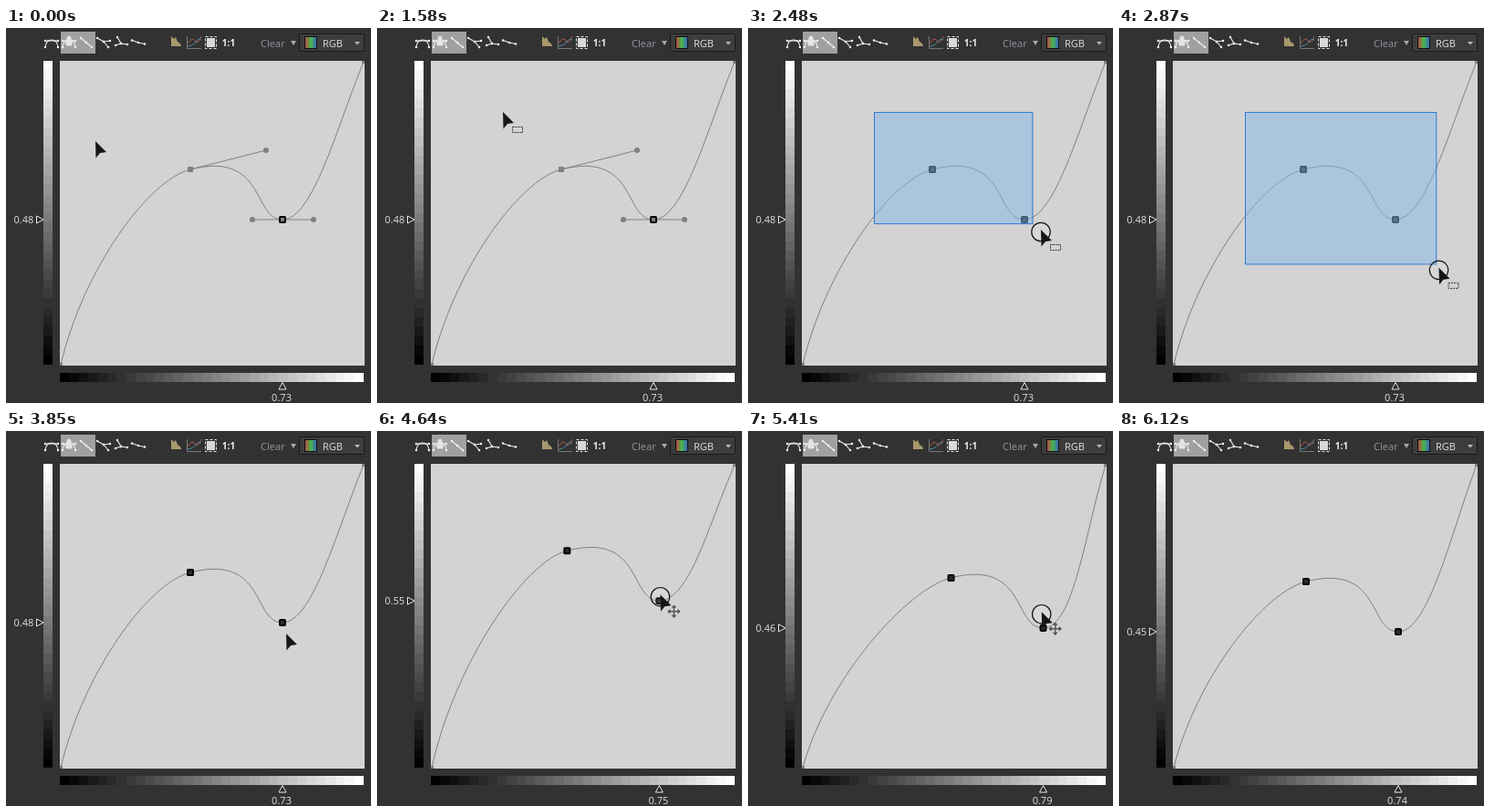
An HTML page that plays this animation: 400 px wide and 411 px high, repeating every 7.84 s.

```html
<!DOCTYPE html>
<html lang="en">
<head>
<meta charset="utf-8">
<title>Curve editor</title>
<style>
  html, body { margin: 0; width: 100%; height: 100%; overflow: hidden; background: #323232; }
  svg { display: block; width: 100%; height: 100%; }
  text { font-family: "Noto Sans", "Open Sans", sans-serif; font-size: 11px; fill: #d6d6d6; }
  .icon { fill: none; stroke: #f0f0f0; stroke-width: 1.1; marker-start: url(#end); marker-mid: url(#end); marker-end: url(#end); }
  .wire { fill: none; stroke: #808080; }
  .knob { fill: #808080; }
  .mark { fill: #282828; stroke: #e8e8e8; }
</style>
</head>
<body>
<svg viewBox="0 0 400 411">
  <defs>
    <linearGradient id="rgb">
      <stop offset="0" stop-color="#c04040"/>
      <stop offset=".5" stop-color="#46b84a"/>
      <stop offset="1" stop-color="#3c60c8"/>
    </linearGradient>
    <marker id="end" viewBox="-2 -2 4 4" markerWidth="3" markerHeight="3"><circle r="1.500" fill="#f0f0f0"/></marker>
    <clipPath id="inside"><rect x="59" y="36" width="334" height="334"/></clipPath>
  </defs>
  <rect width="400" height="411" fill="#323232"/>

  <!-- toolbar -->
  <rect x="60" y="4" width="38" height="24" fill="#a0a0a0"/>
  <g class="icon">
    <path d="M43 14H57"/><path d="M43 21Q44 13 50 13T57 21" marker-mid="none"/>
    <path d="M62 14H76"/><path d="M62 21Q63 13 69 13T76 21"/>
    <path d="M82 11L88 16L94 21"/>
    <path d="M100 11L107 15L114 14"/><path d="M107 15L112 21"/>
    <path d="M122 10L126 17L133 18"/><path d="M120 19L126 17"/>
    <path d="M138 13.500L145 16L152 17.500"/>
  </g>
  <path d="M66 13h6v6h-6zM67 13V11a2 2 0 0 1 4 0V13" fill="#e4e4e4" stroke="#e4e4e4"/>
  <path d="M181 20V9l3 3 2 -2 2 5 3 2 1 3z" fill="#a8986c"/>
  <path d="M198.500 9V22.500H214" fill="none" stroke="#777"/>
  <path d="M199 17Q204 9 207 14T214 9" fill="none" stroke="#b4584a"/>
  <path d="M199 20Q206 19 208 15T214 13" fill="none" stroke="#4a8aa8"/>
  <rect x="220" y="11" width="9" height="10" fill="#d8d8d8"/>
  <rect x="218.500" y="9.500" width="12" height="13" fill="none" stroke="#e8e8e8" stroke-dasharray="3 2"/>
  <text x="244" y="20" text-anchor="middle" style="font-size:10px;font-weight:700;fill:#eee">1:1</text>
  <text x="279" y="21" style="fill:#8b919b">Clear</text>
  <path d="M312 14h6l-3 5z" fill="#a8a8a8"/>
  <rect x="321.500" y="6.500" width="71" height="19" rx="1" fill="#3d3d3d" stroke="#191919"/>
  <rect x="327.500" y="9.500" width="13" height="13" fill="url(#rgb)" stroke="#111"/>
  <text x="347" y="21">RGB</text>
  <path d="M382 15h6l-3 3.500z" fill="#b8b8b8"/>

  <g id="ramps" shape-rendering="crispEdges"></g>
  <rect x="59" y="36" width="334" height="334" fill="#d3d3d3"/>
  <g clip-path="url(#inside)">
    <path id="curve" class="wire"/>
    <path class="knob" d="M58 367h4v4h-4zM390 35h4v4h-4z"/>
  </g>

  <g id="handles">
    <path class="wire" d="M202 155L285 134M270 210H337"/>
    <g class="knob">
      <circle cx="285" cy="134" r="3"/><circle cx="270" cy="210" r="3"/><circle cx="337" cy="210" r="3"/>
    </g>
  </g>
  <rect id="ptA" width="6" height="6" rx=".5" stroke-width="2"/>
  <rect id="ptB" width="6" height="6" rx=".8" stroke="#050505" stroke-width="2"/>
  <rect id="sel" x="138.500" y="92.500" fill="#85b7eb" fill-opacity=".5" stroke="#2f7bd0"/>

  <g id="markY"><path class="mark" d="M33.500 -4V4L41 0z"/><text id="valY" x="8.500" y="4"></text></g>
  <g id="markX"><path class="mark" d="M0 388.500L-4 396H4z"/><text id="valX" x="-1" y="409" text-anchor="middle"></text></g>

  <g id="cursor">
    <circle id="ring" cy="2.500" r="10.200" fill="#fff" fill-opacity=".1" stroke="#151515" stroke-width="1.200"/>
    <path d="M0 0L.5 18.500L5 13L12 12z" fill="#161616"/>
    <rect id="boxIcon" x="10.500" y="16.500" width="11" height="6" fill="none" stroke="#333" stroke-dasharray="2 1"/>
    <path id="moveIcon" d="M15 12.500V24.500M9 18.500H21M13 14.500L15 12.300L17 14.500M13 22.500L15 24.700L17 22.500M11 16.500L8.800 18.500L11 20.500M19 16.500L21.200 18.500L19 20.500" fill="none" stroke="#555" stroke-width="1.400"/>
  </g>
</svg>
<script>
const LOOP = 7840, STEP = 80;
const SELECT = 1880, RELEASE = 3110, GRAB = 4390, DROP = 6120;
const $ = id => document.getElementById(id);
const set = (el, attrs) => { for (const k in attrs) el.setAttribute(k, attrs[k]); };
const show = (id, on) => { $(id).style.display = on ? "" : "none"; };
const mix = (a, b, k) => a + (b - a) * k;

function addCell(attrs) {
  const el = document.createElementNS("http://www.w3.org/2000/svg", "rect");
  set(el, attrs);
  $("ramps").append(el);
}

// grey ramps along both axes
const CELLS = 32, SIZE = 333 / CELLS;
for (let i = 0; i < CELLS; i++) {
  const v = Math.round(i / (CELLS - 1) * 255), fill = `rgb(${v},${v},${v})`;
  addCell({ x: 59 + i * SIZE, y: 378, width: SIZE, height: 10, fill });
  addCell({ x: 41, y: 369 - (i + 1) * SIZE, width: 10, height: SIZE, fill });
}

// pointer stops before the points are grabbed: time, x, y
const STOPS = [[0, 98, 124], [410, 104, 121], [660, 104, 121], [1280, 121, 98], [1520, 138, 92],
  [SELECT, 140, 93], [2480, 321, 221], [2870, 357, 272], [3360, 344, 299], [3840, 307, 222], [GRAB, 302, 205]];

// two vertical swings inside one sideways swing
function shift(t) {
  const p = Math.min(1, Math.max(0, (t - GRAB) / (DROP - STEP / 2 - GRAB)));
  return [3 * p + 19.6 * Math.abs(Math.sin(Math.PI * p)) ** 1.5,
    10 * p - 27.7 * Math.sin(4 * Math.PI * p ** 1.25)];
}

function pointer(t) {
  const i = STOPS.findIndex(s => s[0] > t);
  if (i < 0) {
    const [dx, dy] = shift(t + 60);
    return [302 + dx, 205 + dy];
  }
  const [t0, x0, y0] = STOPS[i - 1], [t1, x1, y1] = STOPS[i], k = (t - t0) / (t1 - t0);
  return [mix(x0, x1, k), mix(y0, y1, k)];
}

function draw(time) {
  const t = Math.floor(time / STEP) * STEP;
  const [dx, dy] = shift(t);
  const ax = 202 + dx, ay = 155 + dy, bx = 303 + dx, by = 210 + dy;

  $("curve").setAttribute("d",
    `M60 369C${mix(60, ax, .17)} ${mix(369, ay, .48)} ${ax - 47} ${ay + 12} ${ax} ${ay}` +
    `C${ax + 83} ${ay - 21} ${bx - 33} ${by} ${bx} ${by}` +
    `C${bx + 33.5} ${by} ${mix(392, bx, .33)} ${mix(37, by, .41)} 392 37`);

  // the selection corner trails the pointer slightly
  const [sx, sy] = pointer(Math.max(0, t - 30));
  const dragging = time >= SELECT && time < RELEASE;
  const both = time >= SELECT && (!dragging || (sx > ax && sy > ay));
  show("sel", dragging);
  set($("sel"), { width: Math.max(0, sx - 138.5), height: Math.max(0, sy - 92.5) });
  show("handles", !both);
  const fill = both ? "#2b2b2b" : "#808080";
  set($("ptA"), { x: ax - 3, y: ay - 3, fill, stroke: both ? "#050505" : "none" });
  set($("ptB"), { x: bx - 3, y: by - 3, fill });

  $("markY").setAttribute("transform", `translate(0 ${by})`);
  $("markX").setAttribute("transform", `translate(${bx} 0)`);
  $("valY").textContent = ((370 - by) / 333).toFixed(2);
  $("valX").textContent = ((bx - 59.5) / 333).toFixed(2);

  $("cursor").setAttribute("transform", `translate(${pointer(t).join(" ")})`);
  show("cursor", time < DROP);
  show("ring", dragging || time >= GRAB);
  show("boxIcon", time >= 1170 && time < RELEASE + STEP);
  show("moveIcon", time >= GRAB - 3 * STEP);
}

const start = performance.now();
function frame() {
  draw((performance.now() - start) % LOOP);
  requestAnimationFrame(frame);
}
frame();
</script>
</body>
</html>
```
